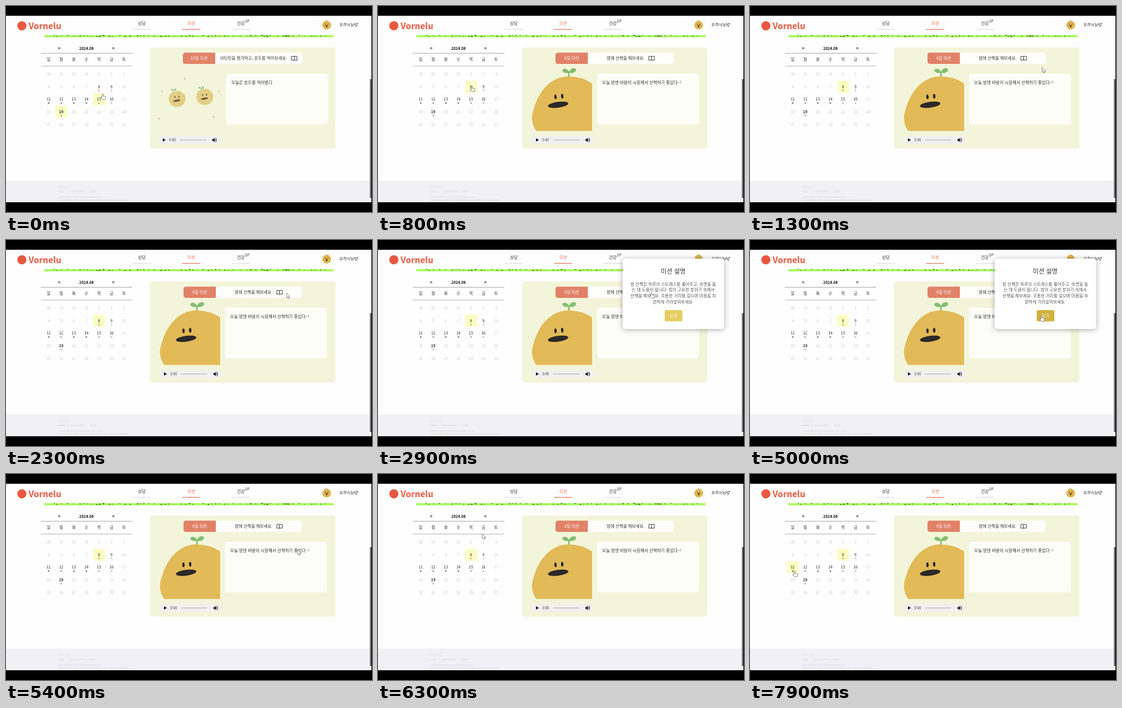
Write an HTML page that moves like this. It is 600x338 px and loops after 8000 ms.

```html
<!DOCTYPE html>
<html lang="ko">
<head>
<meta charset="utf-8">
<style>
html, body { margin: 0; width: 100%; height: 100%; overflow: hidden; background: #000; }
svg { display: block; width: 100vw; height: 100vh; }
text { font-family: 'Noto Sans CJK KR', 'Noto Sans CJK JP', 'Noto Sans CJK', sans-serif; }
</style>
</head>
<body>
<svg id="stage" viewBox="0 0 600 338"></svg>
<script>
const LOOP = 8000;
const CELL = 20.6, CAL_X = 59.7, CAL_Y = 101.8;
const INK = '#333', RED = '#e8705a';

const rect = (x, y, w, h, fill, r = 0, extra = '') =>
  `<rect x="${x}" y="${y}" width="${w}" height="${h}" rx="${r}" fill="${fill}" ${extra}/>`;
const ellipse = (x, y, rx, ry, fill, angle = 0) =>
  `<ellipse cx="${x}" cy="${y}" rx="${rx}" ry="${ry}" fill="${fill}" transform="rotate(${angle} ${x} ${y})"/>`;
const path = (d, fill, extra = '') => `<path d="${d}" fill="${fill}" ${extra}/>`;
// y is the vertical middle of the glyphs
const text = (s, x, y, size = 6.9, fill = INK, anchor = 'middle', extra = '') =>
  `<text x="${x}" y="${y + size * 0.37}" font-size="${size}" fill="${fill}" text-anchor="${anchor}" ${extra}>${s}</text>`;

function random(seed) {
  return () => (seed = (seed * 16807) % 2147483647) / 2147483647;
}

function strip() {
  const rnd = random(11);
  let out = rect(63, 47.8, 474, 3.6, '#a9f95a');
  for (let x = 78; x < 532; x += 4 + rnd() * 8)
    out += rect(x, 47.5 + rnd() * 1.6, 1 + rnd() * 3, 0.8 + rnd(), '#3f7431', 0.5);
  return out;
}

function header() {
  const tabs = [['상담', 222.5, INK, '#ddd'], ['미션', 303.5, RED, RED], ['건강', 385, INK, '#ddd']];
  const rays = Array.from({ length: 10 }, (_, i) =>
    `<line x1="525.7" y1="20.8" x2="525.7" y2="19.6" stroke="#f3e3b0" transform="rotate(${i * 36} 525.7 31.5)"/>`).join('');
  return `<circle cx="26" cy="32.5" r="7.5" fill="#e8573f"/>`
    + text('Vornelu', 37, 32.5, 14, '#e8573f', 'start', 'font-weight="900"')
    + tabs.map(([label, x, ink, line]) => text(label, x, 28, 6.9, ink) + rect(x - 15, 37.8, 30, 1.1, line)).join('')
    + text('UP', 395.3, 25, 5.6)
    + rays + ellipse(525.7, 31.5, 7.2, 7.2, '#dfb650') + rect(525.3, 23.2, 1, 2.2, '#a8974c')
    + ellipse(523.6, 30, .6, 1, INK) + ellipse(527.8, 30, .6, 1, INK) + ellipse(525.7, 33, 1.4, 2, '#5c3a20')
    + text('도하늬님', 546, 30.5, 6.6, '#222', 'start', 'font-style="italic"')
    + path('M571 30l6-2-3 6-1-3z', 'none', 'stroke="#333" stroke-width=".7"');
}

const dotColors = { 8: '#b7a58c', 9: '#c4c4c4', 11: '#777', 12: '#b58b8b', 13: '#777', 14: '#777', 15: '#d89494', 16: '#bbb', 19: '#c9929a' };

function calendar() {
  const bold = 'font-weight="700"';
  let out = text('&lt;', 87, 69.5, 7, '#111', 'middle', bold)
    + text('2024.08', 132, 69.5, 6.2, '#111', 'middle', bold)
    + text('&gt;', 176, 69.5, 7, '#111', 'middle', bold)
    + rect(57, 77, 150, .8, '#999') + rect(57, 98, 150, .8, '#aaa')
    + ['selected', 'hover'].map(id => rect(0, 0, 19.4, 19.4, '#fafdc2', 0, `id="${id}"`)).join('');
  [...'일월화수목금토'].forEach((day, i) => out += text(day, 70 + i * CELL, 88, 6.5));
  for (let i = 0; i < 35; i++) {
    const day = i < 4 ? 28 + i : i - 3;
    const x = 70 + (i % 7) * CELL, y = 112 + Math.floor(i / 7) * CELL;
    const dot = i > 3 && dotColors[day];
    out += text(day, x, y, 6, dot ? '#222' : '#c8c8c8', 'middle', dot && day === 19 ? 'font-weight="800"' : '');
    if (dot) out += ellipse(x, y + 6, 1.3, 1.3, dot);
  }
  return out;
}

const book = (x, y) => path(`M${x} ${y - 3}q-2.6-1-4.6 0v6.2q2.4-.8 4.6 0q2.2-.8 4.6 0v-6.2q-2-1-4.6 0v6`,
  '#fff', 'stroke="#333" stroke-width=".9"');

const sprout = (x, y, k, green) => `<g transform="translate(${x} ${y}) scale(${k})">`
  + path('M0 14V2', 'none', `stroke="${green}" stroke-width="2.4"`)
  + path('M0 4C-2-4-11-3-11 1C-9 5-3 6 0 4C2-4 11-5 12 0C10 5 4 6 0 4Z', green) + '</g>';

function walnut(x, y) {
  return sprout(x - 6, y - 15.5, .42, '#9ccb9d') + ellipse(x, y, 14, 13.3, '#e3ce86')
    + ellipse(x - 3.5, y - 3, .8, 1.7, '#5a4c34') + ellipse(x + 3, y - 3.6, .8, 1.7, '#5a4c34')
    + ellipse(x - .5, y + 3, 6, 1.8, '#755f42', -10);
}

function walnutPair() {
  const sparkles = [[293.5, 119.5], [255.5, 140.5], [349, 140], [251, 185], [340.5, 182]];
  return walnut(280.5, 152.3) + walnut(325.8, 149)
    + sparkles.map(([x, y]) => path(`M${x - 2.2} ${y}l2.2-2.2 2.2 2.2-2.2 2.2z`, '#dcdcaa')).join('');
}

const bigFriend = () => sprout(313, 105, 1, '#82be72')
  + path('M259.5 205C252 195 250 182 256 167C263 142 282 115.5 313 115.5Q335 116 351 127V205Z', '#e2ba57')
  + ellipse(291, 149, 1.8, 3.8, '#161616', -4) + ellipse(302, 148, 1.8, 3.8, '#161616', -4)
  + ellipse(295.3, 162, 16.8, 4.8, '#2b2827', -8);

function player(x) {
  return rect(x, 213.5, 103, 12.5, '#f0f0f0', 6.2)
    + path(`M${x + 8} 217v5.4l4.8-2.7z`, '#111')
    + text('0:00', x + 18.5, 219.8, 5.6, '#444', 'start')
    + rect(x + 36, 219, 43, 1.5, '#c4c5c0', .7)
    + path(`M${x + 89} 218.4h1.6l2.3-2v6.8l-2.3-2h-1.6z`, '#111')
    + path(`M${x + 93.8} 217.8q1.6 2 0 4m.7-5.6q3.2 3.6 0 7.2`, 'none', 'stroke="#111" stroke-width=".8"');
}

function mission({ id, left, right, day, title, titleX, bookX, noteX, note, picture, playerX }) {
  return `<g id="${id}">`
    + rect(left, 76.5, right - left, 18.5, '#fefefc', 4.5)
    + path(`M${left + 53} 76.5H${left + 4}q-4 0-4 4v10.5q0 4 4 4H${left + 53}Z`, '#e18268')
    + text(`${day}일 미션`, left + 26.5, 85.7, 6.7, '#fff')
    + text(title, titleX, 85.7, 6.8, INK, 'start') + book(bookX, 85.9)
    + rect(noteX, 111, 167, 83.5, '#fdfdf8', 4.5)
    + text(note, noteX + 8.3, 125, 6.9, INK, 'start')
    + picture + player(playerX) + '</g>';
}

function modal() {
  const lines = ['밤 산책은 하루의 스트레스를 풀어주고, 숙면을 돕', '는 데 도움이 됩니다. 밤의 고요한 분위기 속에서',
    '산책을 해보세요. 조용한 거리를 걸으며 마음을 차', '분하게 가라앉혀보세요.'];
  return '<g id="modal">'
    + rect(401, 30.5, 166.5, 115.5, '#fff', 4.5, 'style="filter:drop-shadow(0 1px 4px #0005)"')
    + text('미션 설명', 484, 51, 10.2)
    + lines.map((line, i) => text(line, 484, 72 + i * 9.9, 6.9, '#555')).join('')
    + rect(470, 115, 29, 18.5, '#e6cd60', 2.5, 'id="close"')
    + text('닫기', 484.5, 124.3, 7, '#fff') + '</g>';
}

function footer() {
  const pale = '#d3d3d8';
  return rect(0, 286.5, 599, 35.5, '#f1f0f4')
    + text('Vornelu', 85, 296.5, 6, '#e2e2e6', 'start')
    + text('Home', 85, 305, 4, pale, 'start') + text('|', 101, 305, 4, pale)
    + text('Introduction', 106, 305, 4, pale, 'start') + text('|', 132, 305, 4, pale)
    + text('Guide', 137, 305, 4, pale, 'start')
    + text('건강한 하루를 위한 작은 습관을 함께 만들어 갑니다', 85, 313.5, 3.4, pale, 'start')
    + text('이 서비스의 모든 내용은 참고용이며 진단을 대신하지 않으니 전문가와 상의하세요', 85, 319, 3.4, pale, 'start');
}

const outline = 'stroke="#666" stroke-width=".7"';
const cursors = `<g id="arrow">${path('M0 0V8l1.9-1.6 1.2 2.7 1.4-.6-1.2-2.6h2.4z', '#fff', outline)}</g>`
  + `<g id="hand">${path('M-.9.8Q0-.6.9.8V3.8L4 4.4q1.2.3 1 1.6L4.3 9.4H-.4L-3 6.2q0-1.4 1.2-.8l.9.7z', '#fff', outline)}</g>`;

const stage = document.getElementById('stage');
stage.innerHTML = rect(0, 0, 600, 338, '#000') + rect(0, 16, 599, 306, '#fefefe')
  + strip() + header() + calendar()
  + rect(236, 68, 304, 166, '#f3f5da', 5)
  + mission({ id: 'walnutCard', left: 290, right: 486, day: 19, title: '비타민을 챙겨먹고, 호두를 먹어보세요.', titleX: 351,
      bookX: 472.5, noteX: 361, note: '오늘은 호두를 먹어봤다', picture: walnutPair(), playerX: 249 })
  + mission({ id: 'walkCard', left: 291, right: 485, day: 8, title: '밤에 산책을 해보세요.', titleX: 375,
      bookX: 448.5, noteX: 359, note: '오늘 밤엔 바람이 시원해서 산책하기 좋았다~!', picture: bigFriend(), playerX: 251 })
  + footer() + rect(596.6, 120, 2.4, 195, '#666')
  + modal() + cursors;

const el = id => document.getElementById(id);
const show = (id, on) => el(id).style.display = on ? '' : 'none';

// time, x, y of the pointer tip
const route = [
  [0, 158.5, 144], [200, 154, 131], [800, 154, 131], [1250, 479, 101], [1300, 479, 101], [1500, 475, 98],
  [1800, 475, 98], [2000, 467, 96], [2200, 467, 96], [2300, 460, 87], [2600, 448, 86],
  [3100, 448, 86], [3900, 522, 145], [4100, 522, 145], [4500, 483, 123], [4600, 483, 123], [5000, 478, 124],
  [5700, 478, 124], [6300, 171, 98], [6600, 99, 121], [6800, 92, 150], [7000, 92, 150],
  [7200, 74, 160], [7800, 74, 160], [7900, 73, 159], [LOOP, 73, 159]
];

function pointer(t) {
  const i = route.findIndex(key => key[0] > t);
  const [t0, x0, y0] = route[i - 1], [t1, x1, y1] = route[i];
  const k = (t - t0) / (t1 - t0), e = k * k * (3 - 2 * k);
  return [x0 + (x1 - x0) * e, y0 + (y1 - y0) * e];
}

function placeCell(id, col, row) {
  el(id).setAttribute('x', CAL_X + col * CELL + .7);
  el(id).setAttribute('y', CAL_Y + row * CELL + .4);
}

function draw(now) {
  const t = Math.floor((now % LOOP) / 100) * 100; // ten steps a second
  const [x, y] = pointer(t);
  const walking = t >= 800, open = t >= 2800 && t < 5300;

  show('walnutCard', !walking);
  show('walkCard', walking);
  show('modal', open);
  el('modal').style.opacity = t < 2900 ? .8 : 1;
  if (walking) placeCell('selected', 4, 1);
  else placeCell('selected', 1, 3);

  const col = Math.floor((x - CAL_X) / CELL), row = Math.floor((y - CAL_Y) / CELL);
  const onDay = col >= 0 && col < 7 && row > 0 && row < 5 && row * 7 + col - 3 in dotColors;
  show('hover', onDay);
  if (onDay) placeCell('hover', col, row);

  const onClose = open && x > 470 && x < 499 && y > 115 && y < 133.5;
  el('close').setAttribute('fill', onClose ? '#cfb23f' : '#e6cd60');

  const onBook = walking && t < 3200 && x > 443 && x < 454 && y > 81 && y < 91;
  const hand = onDay || onClose || onBook;
  show('hand', hand);
  show('arrow', !hand);
  el(hand ? 'hand' : 'arrow').setAttribute('transform', `translate(${x} ${y})`);
}

const start = performance.now();
function tick() {
  draw(performance.now() - start);
  requestAnimationFrame(tick);
}
tick();
</script>
</body>
</html>
```
